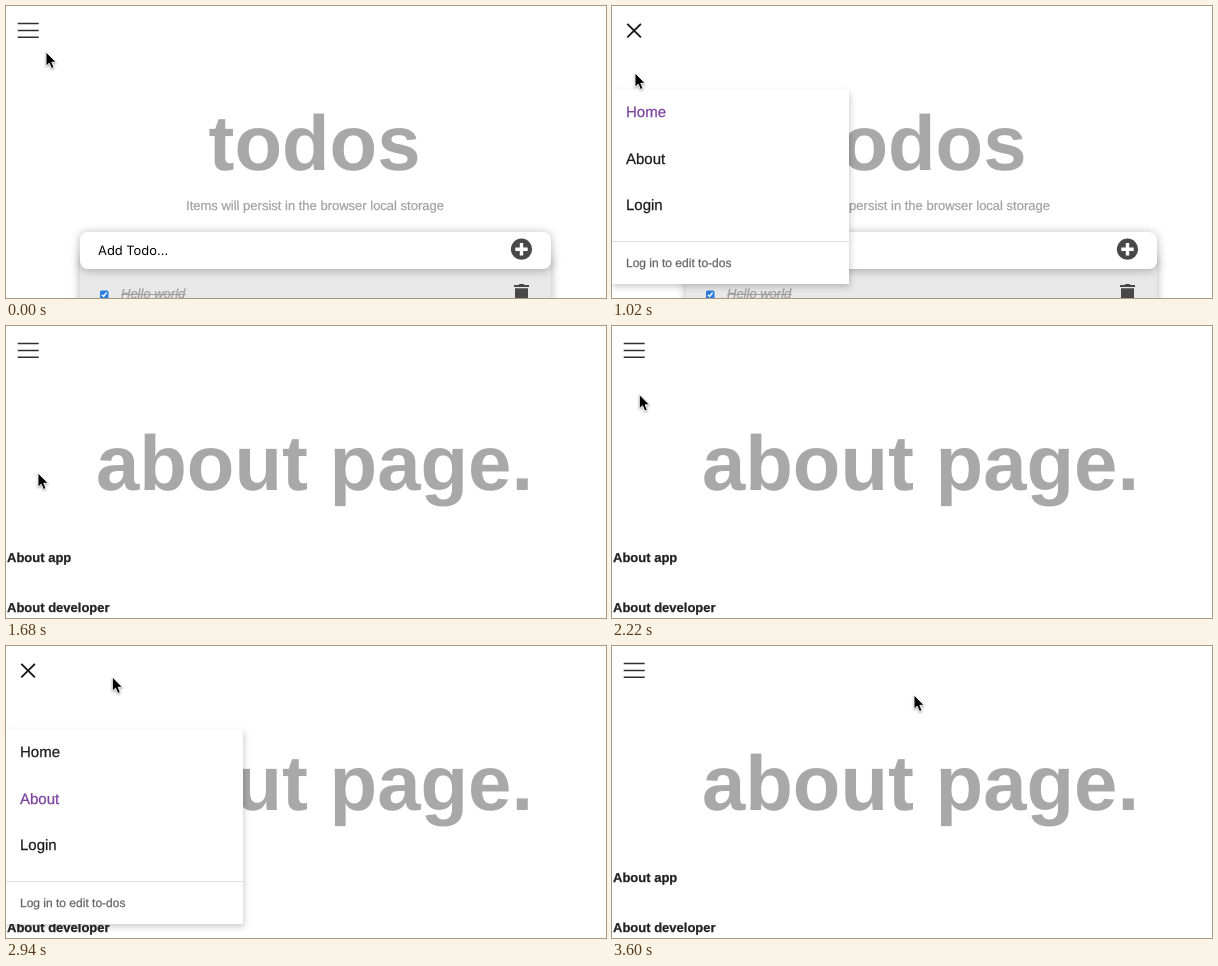
An HTML page that plays this animation: 600x292 px, repeating every 3780 ms.

```html
<!DOCTYPE html>
<html lang="en">
<head>
<meta charset="utf-8">
<title>Todos</title>
<style>
  html, body { margin: 0; width: 100%; height: 100%; overflow: hidden; background: #fff; }
  svg { display: block; width: 100vw; height: 100vh; }
  text {
    font-family: "Liberation Sans", Arial, sans-serif; font-size: 13px; white-space: pre;
    text-rendering: geometricPrecision; stroke-width: .25px;
  }
  .title { font-size: 77.9px; font-weight: bold; fill: #a8a8a8; text-anchor: middle; }
  .sub { fill: #a2a2a2; stroke: #a2a2a2; text-anchor: middle; }
  .field { font-family: Inter, sans-serif; font-size: 12.9px; }
  .done { font-style: italic; fill: #a0a0a0; stroke: #a0a0a0; }
  .head { font-weight: bold; fill: #222; stroke: #222; }
  .link { font-size: 15px; fill: #1c1c1c; stroke: #1c1c1c; }
  .link.active { fill: #7c42a0; stroke: #7c42a0; }
  .note { font-size: 12px; fill: #666; stroke: #666; }
  .card { filter: drop-shadow(0 1px 5px rgba(0, 0, 0, .3)); }
  .sheet { filter: drop-shadow(1px 3px 3px rgba(0, 0, 0, .2)); }
  .pointer { filter: drop-shadow(0 1.5px 1px rgba(0, 0, 0, .35)); }
</style>
</head>
<body>
<svg viewBox="0 0 600 292" preserveAspectRatio="none">
  <g id="home">
    <text class="title" x="308.5" y="164">todos</text>
    <text class="sub" x="309" y="204">Items will persist in the browser local storage</text>
    <rect class="card" x="74" y="250" width="471" height="60" fill="#e8e8e8"/>
    <rect class="card" x="74" y="226" width="471" height="37" rx="8" fill="#fff"/>
    <text class="field" x="92" y="249">Add Todo...</text>
    <circle cx="515.5" cy="243.2" r="10.6" fill="#484848"/>
    <path d="M509.3 243.2h12.4M515.5 237v12.4" stroke="#fff" stroke-width="3.4"/>
    <rect x="94" y="284.5" width="8.5" height="8.5" rx="1.5" fill="#2a7de1"/>
    <path d="M96 288.8l1.6 1.7 3-4" fill="none" stroke="#fff" stroke-width="1.3"/>
    <text class="done" x="115" y="292.3">Hello world</text>
    <path d="M115 288.5h65" stroke="#a0a0a0"/>
    <path d="M508 279h4.5l1-1h4l1 1h4.5v2h-15zM509 282.3h13v12h-13z" fill="#484848"/>
  </g>
  <g id="about">
    <text class="title" x="308.5" y="164">about page.</text>
    <text class="head" x="1" y="235.6">About app</text>
    <text class="head" x="1" y="285.6">About developer</text>
  </g>
  <g id="menu">
    <rect class="sheet" x="0" y="83.5" width="237" height="194.5" fill="#fff"/>
    <text class="link" id="homeLink" x="14" y="111">Home</text>
    <text class="link" id="aboutLink" x="14" y="157.6">About</text>
    <text class="link" x="14" y="204.3">Login</text>
    <path d="M0 235.5h237" stroke="#dedede"/>
    <text class="note" x="14" y="261">Log in to edit to-dos</text>
  </g>
  <path id="bars" d="M11.7 17.5h21M11.7 24.4h21M11.7 31.3h21" stroke="#303030" stroke-width="1.5"/>
  <path id="cross" d="M15.3 17.8l13.6 13.6M28.9 17.8l-13.6 13.6" stroke="#181818" stroke-width="1.9"/>
  <g id="arrow" class="pointer">
    <path d="M0 0V14.2L3.2 11.2L5.5 16.5L8 15.4L5.8 10.3H10.2Z" fill="#000" stroke="#fff" stroke-width=".9"/>
  </g>
  <g id="hand" class="pointer" stroke="#000" stroke-linejoin="round">
    <path d="M-2.4 1.2C-2.4-.4 .7-.4 .9 1.2L1.6 5.6C1.8 4.4 4.2 4.4 4.5 5.8C5 4.9 7 5.1 7.2 6.6C7.9 5.9 9.7 6.3 9.8 8C9.9 11 9.3 12.5 8.4 14V16.6H-.4C-1 14.6-4.2 12-6 9.2C-7 7.4-4.9 6.4-3.5 7.8L-1.2 10Z" fill="#fff" stroke-width="1.1"/>
    <path d="M1.4 9.6v4M4 9.6v4M6.6 9.6v4" stroke-width=".9"/>
  </g>
</svg>
<script>
  const LOOP = 3780, STEP = 60, SLIDE = 250, MENU_WIDTH = 237;
  const NAVIGATE = 1420;
  // Menu toggles: [opens, closes]
  const openings = [[485, NAVIGATE], [2467, 3350]];
  // Pointer tip: [time, x, y]
  const path = [
    [0, 40, 46], [420, 23, 18.5], [870, 23, 18.5], [1020, 23, 67],
    [1380, 32, 147], [1920, 32, 147], [2400, 24.5, 21.5], [2790, 24.5, 21.5],
    [3020, 150, 36], [3280, 302, 49], [LOOP, 302, 49]
  ];

  const el = id => document.getElementById(id);
  const show = (id, on) => el(id).setAttribute("display", on ? "inline" : "none");
  const move = (id, x, y) => el(id).setAttribute("transform", `translate(${x} ${y})`);
  const ease = p => {
    p = Math.min(1, Math.max(0, p));
    return p * p * (3 - 2 * p);
  };

  function tipAt(t) {
    const i = path.findIndex(point => point[0] > t);
    const [t0, x0, y0] = path[i - 1], [t1, x1, y1] = path[i];
    const p = (t - t0) / (t1 - t0);
    return [x0 + (x1 - x0) * p, y0 + (y1 - y0) * p];
  }

  function draw(t) {
    const onHome = t < NAVIGATE;
    const isOpen = openings.some(([a, b]) => t >= a && t < b);
    const shown = openings.reduce((sum, [a, b]) =>
      sum + ease((t - a) / SLIDE) - ease((t - b) / SLIDE), 0);

    show("home", onHome);
    show("about", !onHome);
    el("homeLink").classList.toggle("active", onHome);
    el("aboutLink").classList.toggle("active", !onHome);
    move("menu", (shown - 1) * MENU_WIDTH, 0);
    show("menu", shown > 0.001);
    show("bars", !isOpen);
    show("cross", isOpen);

    const [x, y] = tipAt(t);
    const overButton = x < 38 && y < 40;
    const overLink = isOpen && x < 60 && y > 92 && y < 210;
    const pointing = overButton || overLink;
    show("hand", pointing);
    show("arrow", !pointing);
    move(pointing ? "hand" : "arrow", x, y);
  }

  const start = performance.now();
  function tick() {
    const t = (performance.now() - start) % LOOP;
    draw(Math.floor(t / STEP) * STEP);
    requestAnimationFrame(tick);
  }
  tick();
</script>
</body>
</html>
```
